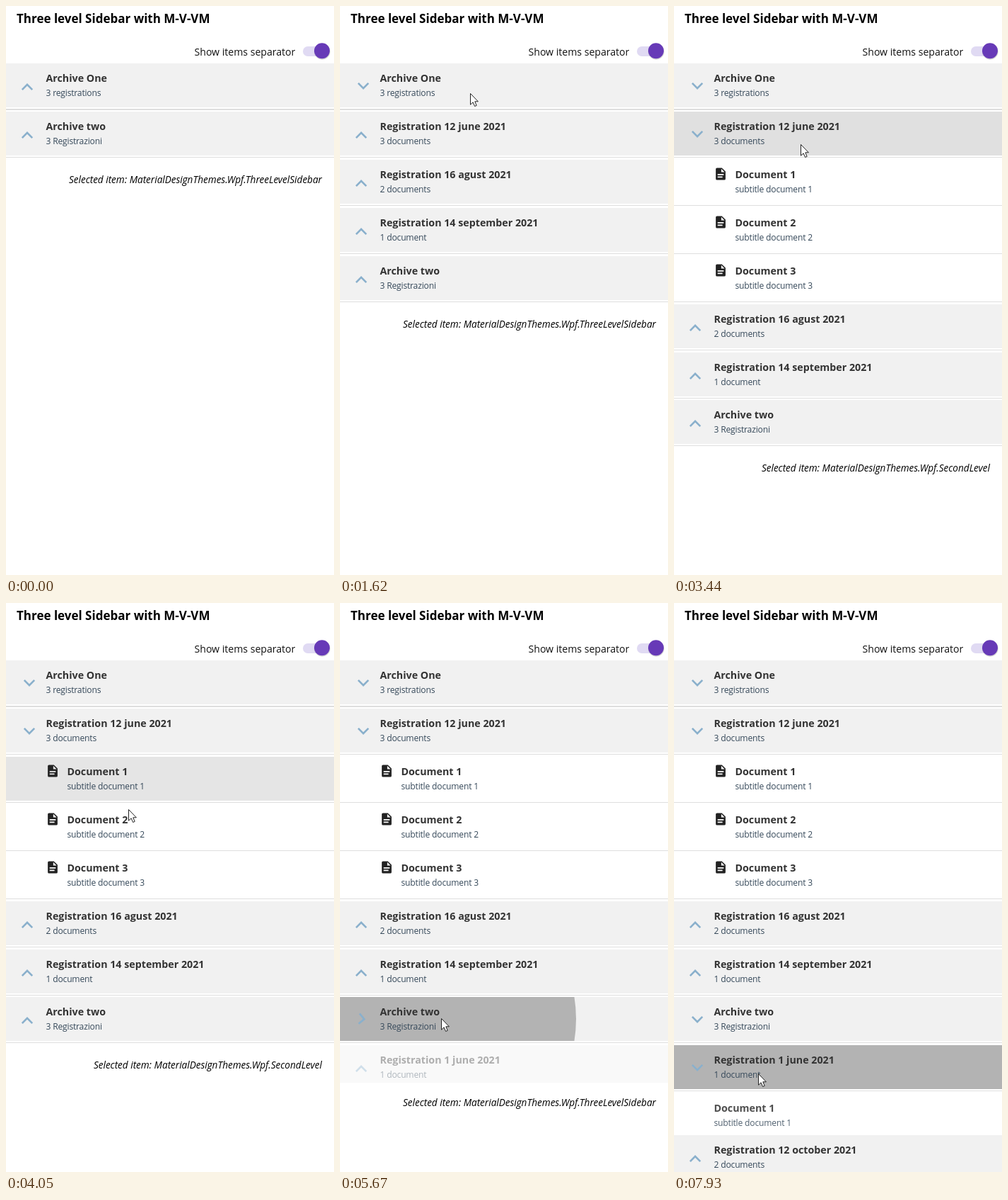
These frames come from a looping animation (464 px wide and 803 px high, 8 s). An HTML page:

```html
<!DOCTYPE html>
<html lang="en">
<head>
<meta charset="utf-8">
<title>Three level Sidebar</title>
<style>
html, body { margin: 0; width: 100%; height: 100%; overflow: hidden; background: #fff; }
svg { display: block; }
text { font-family: "Open Sans", "Noto Sans", sans-serif; white-space: pre; }
.head { font-size: 17px; font-weight: 700; fill: #000; }
.label { font-size: 14.1px; fill: #111; }
.name { font-size: 14.25px; font-weight: 700; fill: #333; }
.sub { font-size: 12.1px; letter-spacing: -.18px; fill: #36495a; }
.pick { font-size: 13.6px; font-style: italic; fill: #000; text-anchor: end; }
</style>
</head>
<body>
<svg id="stage" width="464" height="803" viewBox="0 0 464 803">
  <rect width="464" height="803" fill="#fff"/>
  <text class="head" x="15" y="24">Three level Sidebar with M-V-VM</text>
  <text class="label" x="266.5" y="70">Show items separator</text>
  <rect x="420" y="57" width="34" height="14" rx="7" fill="#e0daf3"/>
  <circle cx="447.3" cy="64.3" r="11.4" fill="#000" opacity=".16"/>
  <circle cx="447" cy="63.3" r="11" fill="#673ab7"/>
  <g id="list"></g>
  <text id="pick" class="pick" x="447"></text>
  <path id="cursor" d="M.5 .5V16.2L4.1 12.8L6.6 18.5L9.2 17.4L6.8 11.8H11.4Z" fill="#fff" stroke="#222" stroke-width="1"/>
</svg>
<script>
const NS = 'http://www.w3.org/2000/svg';
const LOOP = 8000, TOP = 81, PITCH = 67.9, ROW = 62;
const CHEVRON = 'M7.41 15.41L12 10.83L16.59 15.41L18 14L12 8L6 14Z';
const FILE = 'M13 9H18.5L13 3.5ZM6 2H14L20 8V20A2 2 0 0 1 18 22H6A2 2 0 0 1 4 20V4A2 2 0 0 1 6 2M15 18V16H7V18ZM17 14V12H7V14Z';

const node = (name, sub, opt = {}) => ({ name, sub, kids: [], ...opt });
const doc = (n, icon = true) => node('Document ' + n, 'subtitle document ' + n, { doc: true, icon });

// click: time, x and y of the press that opens the row
const tree = [
  node('Archive One', '3 registrations', { click: [1140, 184, 123], line: 2, kids: [
    node('Registration 12 june 2021', '3 documents', { click: [3000, 179, 195], kids: [doc(1), doc(2), doc(3)] }),
    node('Registration 16 agust 2021', '2 documents'),
    node('Registration 14 september 2021', '1 document')
  ] }),
  node('Archive two', '3 Registrazioni', { click: [5510, 144, 587], kids: [
    node('Registration 1 june 2021', '1 document', { click: [7600, 119, 664], kids: [doc(1, false)] }),
    node('Registration 12 october 2021', '2 documents')
  ] })
];

// time, x, y; the fourth value eases the way to that point
const path = [
  [240, 339, 772], [1000, 184, 123, 1], [2020, 184, 123], [2530, 174, 203, 1],
  [2640, 174, 203], [2700, 179, 195], [3600, 179, 195], [3740, 179, 179],
  [3820, 179, 182], [3980, 176, 254], [4050, 173, 290], [4260, 145, 586],
  [4510, 178, 179, 1], [4740, 178, 179], [5280, 143, 586, 1], [6130, 143, 586],
  [6300, 144, 640, 1], [6610, 144, 640], [6700, 150, 560], [6800, 160, 430],
  [6900, 166, 376], [6980, 167, 372], [7390, 110, 689, 1], [7410, 110, 689],
  [7450, 119, 664]
];

const clamp = v => Math.min(1, Math.max(0, v));
const ease = v => .5 - .5 * Math.cos(Math.PI * v);

function add(parent, tag, attrs, text) {
  const el = document.createElementNS(NS, tag);
  set(el, attrs);
  if (text) el.textContent = text;
  parent.appendChild(el);
  return el;
}

function set(el, attrs) {
  for (const k in attrs) el.setAttribute(k, attrs[k]);
}

function build(n, parent) {
  const x = n.icon ? 86.5 : 56.5;
  n.g = add(parent, 'g', {});
  n.bg = add(n.g, 'rect', { width: 464, height: ROW, fill: n.doc ? '#fff' : '#f1f1f1' });
  if (n.click) {
    const box = add(n.g, 'svg', { width: 464, height: ROW });
    n.ripple = add(box, 'circle', { cx: n.click[1], fill: '#000' });
  }
  add(n.g, 'rect', { y: 64, width: 464, height: n.line || 1, fill: '#dedede' });
  if (n.icon) {
    add(n.g, 'path', { d: FILE, fill: '#222', 'fill-rule': 'evenodd',
      transform: 'translate(66 20) scale(.86) translate(-12 -12)' });
  }
  if (!n.doc) {
    n.arrow = add(n.g, 'g', {});
    add(n.arrow, 'path', { d: CHEVRON, fill: '#8ab0cc',
      transform: 'translate(30 33) scale(1.36) translate(-12 -11.7)' });
  }
  add(n.g, 'text', { class: 'name', x, y: 26 }, n.name);
  add(n.g, 'text', { class: 'sub', x, y: 46 }, n.sub);
  if (n.kids.length) {
    n.box = add(parent, 'svg', { width: 464 });
    n.kids.forEach(k => build(k, n.box));
  }
}

function cursorAt(t) {
  let a = path[0];
  for (const b of path) {
    if (t < b[0]) {
      const u = clamp((t - a[0]) / (b[0] - a[0]));
      const v = b[3] ? ease(u) : u;
      return [a[1] + (b[1] - a[1]) * v, a[2] + (b[2] - a[2]) * v];
    }
    a = b;
  }
  return [a[1], a[2]];
}

// Places a row and its children, returns the height they take.
function place(n, y, base, t, hoverY) {
  const top = Math.round(y), abs = base + top;
  set(n.g, { transform: `translate(0 ${top})` });
  if (n.doc) {
    const over = n.icon && hoverY >= abs && hoverY < abs + PITCH - 3;
    set(n.bg, { fill: over ? '#e5e5e5' : '#fff' });
  }
  if (!n.click) return PITCH;

  const dt = t - n.click[0];
  const open = clamp((dt - 20) / 360);
  set(n.ripple, {
    cy: n.click[2] - abs,
    r: dt > 0 ? dt * 1.18 : 0,
    opacity: .26 * (1 - clamp((dt - 340) / 140))
  });
  set(n.arrow, { transform: `rotate(${180 * ease(clamp(dt / 310))} 31.5 32.5)` });

  const kidTop = Math.round(y + PITCH);
  let full = 0;
  for (const k of n.kids) full += place(k, full, base + kidTop, t, hoverY);
  set(n.box, { y: kidTop, height: Math.max(.01, full * open), opacity: open,
    display: open ? 'inline' : 'none' });
  return PITCH + full * open;
}

const byId = id => document.getElementById(id);
const list = byId('list'), pick = byId('pick'), cursor = byId('cursor');
tree.forEach(n => build(n, list));

function draw(t) {
  const [cx, cy] = cursorAt(t);
  const hoverY = t < 3740 ? -1 : cursorAt(t - 60)[1];
  let y = TOP;
  for (const n of tree) y += place(n, y, 0, t, hoverY);

  const second = (t >= 3000 && t < 5510) || t >= 7600;
  pick.textContent = 'Selected item: MaterialDesignThemes.Wpf.' + (second ? 'SecondLevel' : 'ThreeLevelSidebar');
  set(pick, { y: Math.round(y + 33) });
  set(cursor, {
    transform: `translate(${Math.round(cx)} ${Math.round(cy)})`,
    display: t < 240 ? 'none' : 'inline'
  });
}

const start = performance.now();
function tick() {
  draw((performance.now() - start) % LOOP);
  requestAnimationFrame(tick);
}
tick();
</script>
</body>
</html>
```
